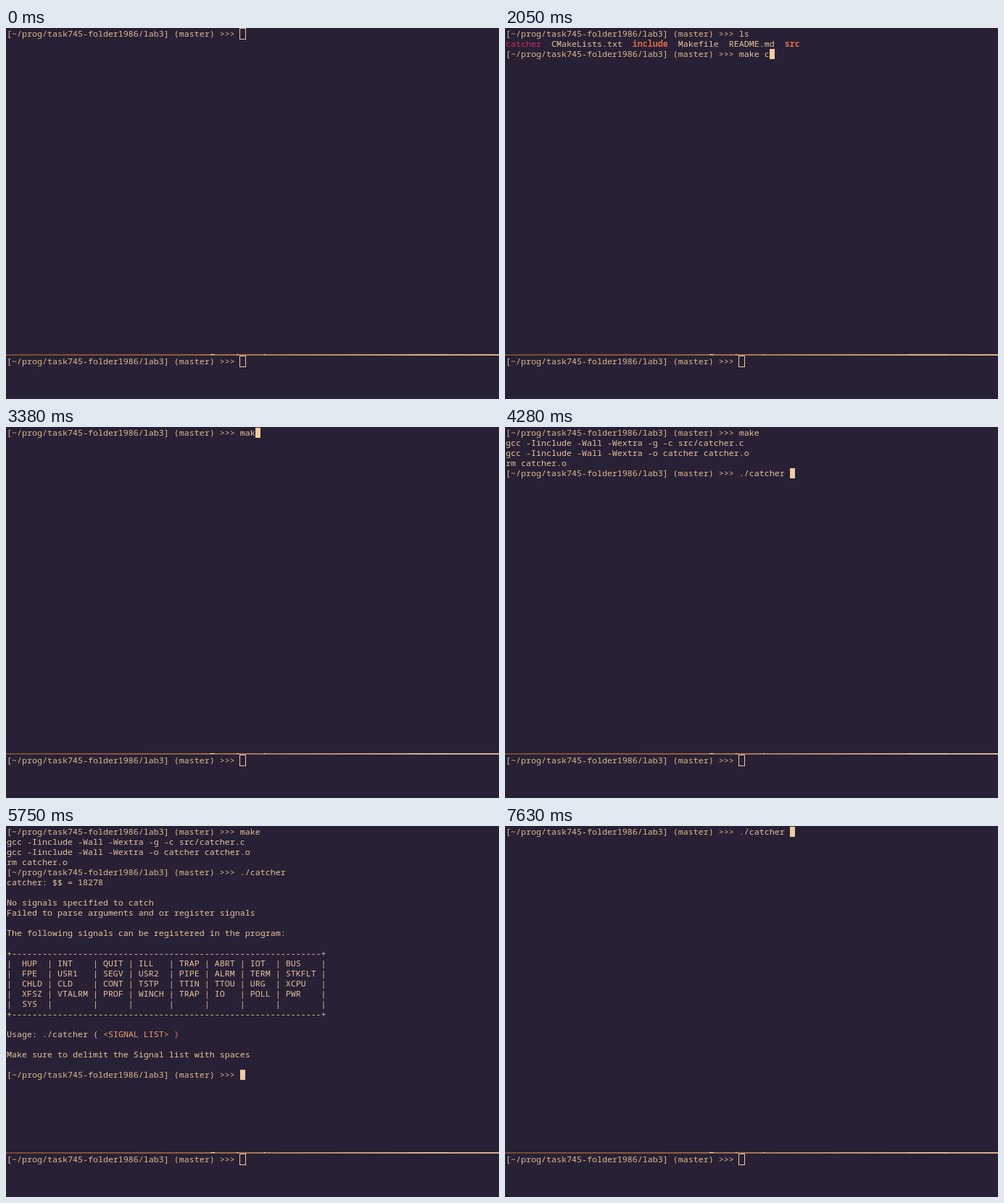
Recreate the animation shown at these times as an HTML page. Size 680 by 513 pixels, loop 8000 ms.

```html
<!DOCTYPE html>
<html lang="en">
<head>
<meta charset="utf-8">
<title>Terminal session</title>
<style>
  html, body { margin: 0; width: 100%; height: 100%; overflow: hidden; background: #282034; }
  pre {
    position: absolute; left: 1px; margin: 0;
    font: 300 11.6667px/14px "Noto Sans Mono", "DejaVu Sans Mono", monospace;
    font-kerning: none; font-variant-ligatures: none;
    color: #e6c39e;
  }
  #top { top: 1px; }
  #bottom { top: 454px; }
  #divider {
    position: absolute; top: 451px; width: 680px; height: 2px;
    background:
      linear-gradient(#f3d9b4, #f3d9b4) 282px 0 / 6px 1px no-repeat,
      linear-gradient(#e6c39a, #e6c39a) 318px 0 / 3px 1px no-repeat,
      linear-gradient(#ecd0a8, #ecd0a8) 356px 0 / 2px 1px no-repeat,
      linear-gradient(#dfc09a, #dfc09a) 556px 0 / 54px 1px no-repeat,
      linear-gradient(90deg, #75492f, #8d5d3d 35%, #b58861 60%, #cba67e 80%, #d6b28a);
  }
  i { position: absolute; width: 7px; height: 14px; background: #f0cca6; }
  i.hollow { margin: -1px; border: 1px solid #f0cca6; background: none; }
  .path { color: #e0bb90; }
  .arrows { color: #e3b594; }
  .program { color: #d8265f; }
  .folder { color: #dc6b4a; font-weight: bold; }
  .brace { color: #c4b096; }
  .orange { color: #e5a273; }
  .red { color: #dc7058; }
</style>
</head>
<body>
<pre id="top"></pre>
<div id="divider"></div>
<pre id="bottom"></pre>
<script>
const LOOP = 8000;
const paint = (style, text) => `<span class="${style}">${text}</span>`;
const block = '<i></i>', hollow = '<i class="hollow"></i>';
const prompt = paint('path', '[~/prog/task745-folder1986/lab3] (master)') +
  ' ' + paint('arrows', '&gt;&gt;&gt;') + ' ';

const listing = [paint('program', 'catcher'), 'CMakeLists.txt', paint('folder', 'include'),
  'Makefile', 'README.md', paint('folder', 'src')].join('  ');

const widths = [4, 6, 4, 5, 4, 4, 4, 6];
const border = '+' + '-'.repeat(61) + '+';
const tableRow = names => {
  const cells = names.split(' ');
  return '| ' + widths.map((w, i) => ' ' + (cells[i] || '').padEnd(w) + ' ').join('|') + '|';
};
const help = [
  'catcher: $$ = 18278', '',
  'No signals specified to catch',
  'Failed to parse arguments and or register signals', '',
  'The following signals can be registered in the program:', '',
  border,
  ...['HUP INT QUIT ILL TRAP ABRT IOT BUS',
    'FPE USR1 SEGV USR2 PIPE ALRM TERM STKFLT',
    'CHLD CLD CONT TSTP TTIN TTOU URG XCPU',
    'XFSZ VTALRM PROF WINCH TRAP IO POLL PWR',
    'SYS'].map(tableRow),
  border, '',
  'Usage: ./catcher ' + paint('brace', '{') + ' ' +
    paint('orange', '&lt;SIGNAL LIST&gt;') + ' ' + paint('red', '}'), '',
  'Make sure to delimit the Signal list with spaces', ''
];

// Each state is a time and the markup shown from then on.
const states = [];
let history = '', input = '';
const show = (time, cursor = block) =>
  states.push({ time, markup: history + prompt + input + cursor });
const type = (start, step, keys) => [...keys].forEach((key, i) => {
  input += key;
  show(start + i * step);
});
const submit = lines => {
  history += [prompt + input, ...lines].join('\n') + '\n';
  input = '';
};
const run = (time, ...lines) => { submit(lines); show(time); };
const clear = time => { history = input = ''; show(time); };
const print = (time, line) => {
  history += line + '\n';
  states.push({ time, markup: history + block });
};

show(0, hollow);
show(170);
show(750, '');
type(1080, 80, 'ls');
run(1230, listing);

type(1600, 70, 'make ');
type(2050, 85, 'cle');
type(2360, 60, 'an');
run(2560, 'rm -f catcher', 'rm -f catcher.o');

clear(2870);
type(3200, 90, 'make');
submit([]);
print(3520, 'gcc -Iinclude -Wall -Wextra -g -c src/catcher.c');
print(3570, 'gcc -Iinclude -Wall -Wextra -o catcher catcher.o');
history += 'rm catcher.o\n';
show(3620);

type(3800, 0, '.');
type(4000, 90, '/c');
input += 'atcher ';
show(4280);
run(4580, ...help);
show(5150, '');
show(5750);
type(6280, 0, '.');
input = '';
show(6720);

clear(6880);
type(7170, 0, '.');
type(7340, 70, '/c');
type(7560, 0, 'a');
input += 'tcher ';
show(7630);

const screen = document.getElementById('top');
document.getElementById('bottom').innerHTML = prompt + hollow;

let current;
const start = performance.now();
function draw() {
  const time = Math.max(0, performance.now() - start) % LOOP;
  const state = states.findLast(s => s.time <= time);
  if (state !== current) screen.innerHTML = (current = state).markup;
  requestAnimationFrame(draw);
}
draw();
</script>
</body>
</html>
```
